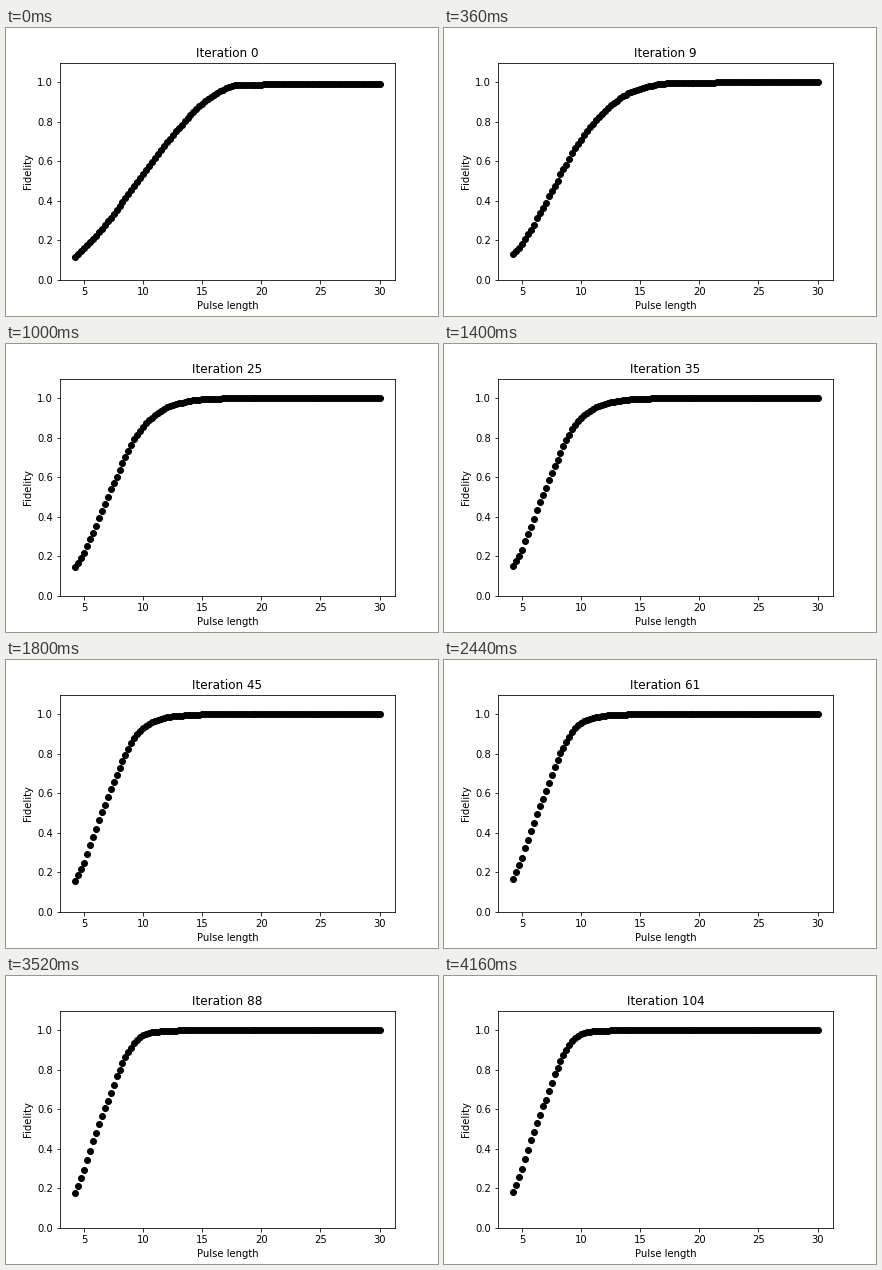
A matplotlib script for the animation above (4.6 s loop, 432x288 px).

```python
import numpy as np
import matplotlib.pyplot as plt
from matplotlib.animation import FuncAnimation

FRAMES, STEP_MS, LAST = 115, 40, 104


def smooth(xs, ys, x):
    """Monotone cubic interpolation along the first axis."""
    xs, ys = np.asarray(xs, float), np.asarray(ys, float)
    shape = (-1,) + (1,) * (ys.ndim - 1)
    h = np.diff(xs).reshape(shape)
    d = np.diff(ys, axis=0) / h
    a, b = d[:-1], d[1:]
    same = a * b > 0
    m = np.zeros_like(ys)
    m[1:-1] = np.where(same, 2 * a * b / np.where(same, a + b, 1), 0)
    m[0] = 1.5 * d[0] - 0.5 * m[1]
    m[-1] = 1.5 * d[-1] - 0.5 * m[-2]
    x = np.asarray(x, float)
    i = np.clip(np.searchsorted(xs, x, side="right") - 1, 0, len(xs) - 2)
    w = h[i]
    t = ((x - xs[i]).reshape(shape)) / w
    return (ys[i] * (1 + 2 * t) * (1 - t) ** 2 + m[i] * w * t * (1 - t) ** 2
            + ys[i + 1] * t * t * (3 - 2 * t) + m[i + 1] * w * t * t * (t - 1))


pulse = np.arange(4.25, 30.1, 0.25)
knots = [4.25, 5, 6, 7, 8, 9, 9.5, 10, 11, 12, 13, 14, 15, 16, 17, 18, 22, 30]

# Fidelity at the knots for selected iterations; rows are padded with 1.
learned = {
    9: [.130, .180, .277, .390, .500, .610, .663, .710, .790, .855, .906,
        .945, .966, .983, .9932, .9955, .9993],
    25: [.145, .217, .353, .500, .635, .763, .813, .857, .915, .954, .974,
         .988, .9945, .9975, .9995],
    45: [.155, .250, .418, .580, .727, .853, .898, .930, .966, .984, .9925,
         .9968, .9994],
    61: [.165, .275, .450, .610, .768, .883, .928, .955, .982, .9928, .9968,
         .9992],
    88: [.175, .295, .480, .640, .800, .913, .953, .977, .992, .9972, .9994],
    104: [.180, .300, .485, .650, .810, .925, .961, .981, .9942, .9985, .9997],
}


def ripple(curve, k):
    """Small sawtooth that restarts after each whole pulse length."""
    q = np.round((pulse % 1) * 4).astype(int)
    early, late = np.array([0, .009, .006, 0]), np.array([0, .004, .004, .007])
    mix = k / LAST
    size = np.clip(2 * (1 - curve), 0, 1) * (pulse > 5)
    return curve + size * (early * (1 - mix) + late * mix)[q]


start = np.sin(0.0823 * np.minimum(pulse, 19)) ** 2
start = np.minimum(start, np.minimum(0.986 + 0.0013 * (pulse - 17.75), 0.991))

curves = [start]
for k, row in learned.items():
    row = row + [1.0] * (len(knots) - len(row))
    curves.append(ripple(smooth(knots, row, pulse), k))

history = smooth([0, *learned], curves, np.arange(LAST + 1))

fig, ax = plt.subplots(figsize=(6, 4), dpi=72, facecolor="white")
fig.subplots_adjust(left=0.125, right=0.9, bottom=0.125, top=0.88)
dots, = ax.plot(pulse, history[0], "ko")
ax.set(xlim=(2.9625, 31.2875), ylim=(0, 1.1),
       xlabel="Pulse length", ylabel="Fidelity")
title = ax.set_title("Iteration 0")


def update(frame):
    k = min(frame, LAST)
    dots.set_ydata(history[k])
    title.set_text(f"Iteration {k}")
    return dots, title


anim = FuncAnimation(fig, update, frames=FRAMES, interval=STEP_MS,
                     repeat=True, repeat_delay=0)
plt.show()
```
